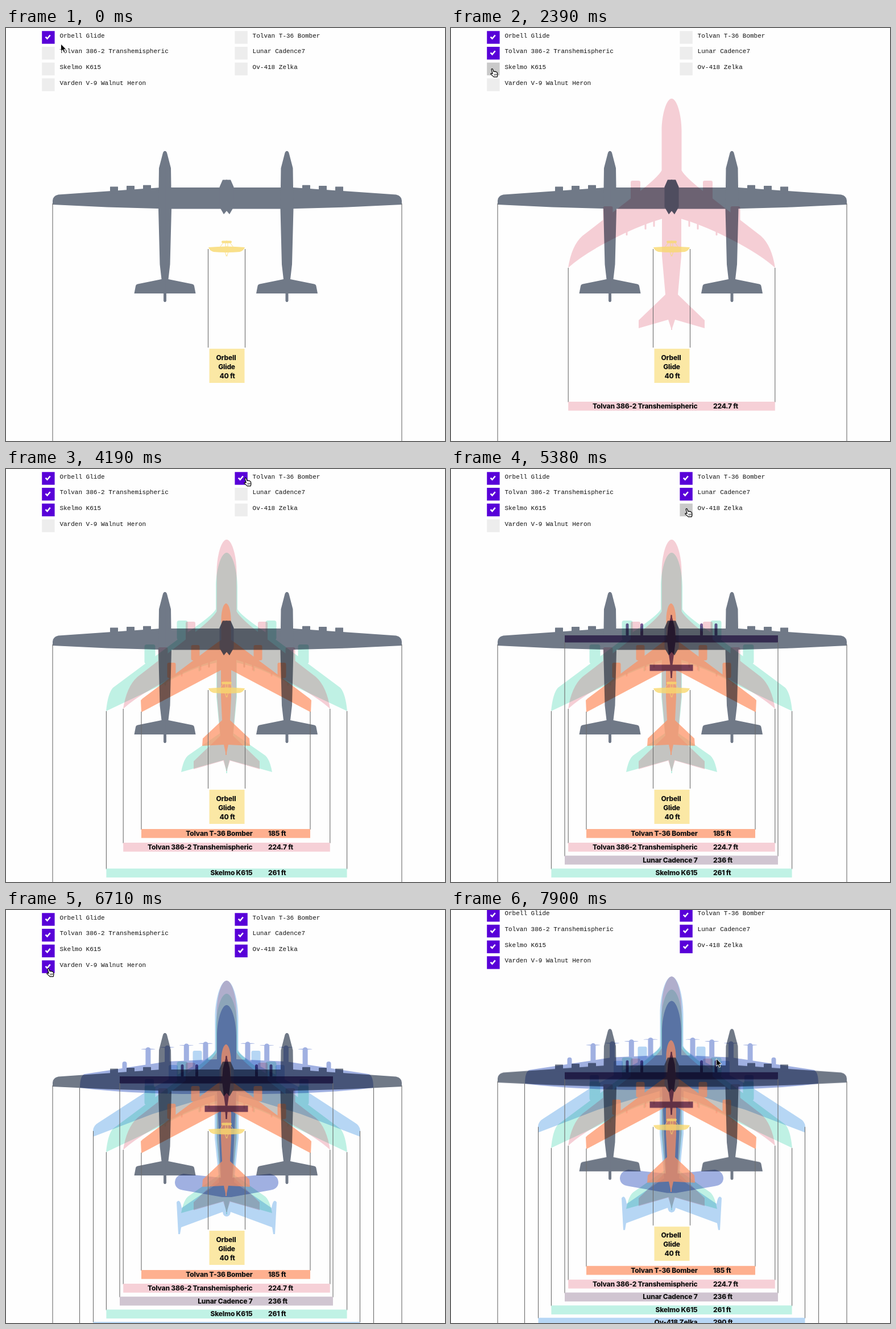
Recreate the animation shown at these times as an HTML page. Size 772x725 px, loop 8000 ms.

```html
<!DOCTYPE html>
<html lang="en">
<head>
<meta charset="utf-8">
<title>Wingspan comparison</title>
<style>
  html, body { margin: 0; width: 100%; height: 100%; overflow: hidden; background: #fefefe; }
  svg { display: block; width: 772px; height: 725px; }
  .item { font: 11px "Liberation Mono", "DejaVu Sans Mono", monospace; fill: #111; }
  .tag { font: 800 12px Inter, "Open Sans", sans-serif; letter-spacing: -.2px; fill: #111; }
  .drop { stroke: #6c6c6c; stroke-width: 1.1; fill: none; }
  .blend { mix-blend-mode: multiply; }
</style>
</head>
<body>
<svg id="stage" viewBox="0 0 772 725" xmlns="http://www.w3.org/2000/svg"></svg>
<script>
const LOOP = 8000, STEP = 150, MID = 388;
const stage = document.getElementById('stage');

function add(parent, tag, attrs = {}, text) {
  const el = document.createElementNS('http://www.w3.org/2000/svg', tag);
  for (const k in attrs) el.setAttribute(k, attrs[k]);
  if (text) el.textContent = text;
  parent.appendChild(el);
  return el;
}
const show = (el, on) => el.setAttribute('visibility', on ? 'visible' : 'hidden');

const scene = add(stage, 'g');
add(scene, 'rect', { x: 0, y: -20, width: 772, height: 800, fill: '#fefefe' });

const plane = (fill, opacity) => add(scene, 'g', opacity ? { fill, opacity } : { fill, class: 'blend' });

// Draws the right half of a shape and its reflection; x is measured from cx.
function mirror(g, d, cx = MID) {
  for (const s of [1, -1]) add(g, 'path', { d, transform: `translate(${cx} 0) scale(${s} 1)` });
}
// Mirrored pods (engines, floats, propellers) whose tops follow the line y0 + slope * x.
function pods(g, xs, y0, slope, w, h, r = w / 2) {
  for (const x of xs)
    for (const s of [-1, 1])
      add(g, 'rect', { x: MID + s * x - w / 2, y: y0 + slope * x, width: w, height: h, rx: r });
}
// A rounded nose of half-width w, followed by the wing and tail outlines.
function fuselage(g, nose, w, wing, tail, cx) {
  mirror(g, `M-1 ${nose}H0C${w * .55} ${nose} ${w} ${nose + w * 1.7} ${w} ${nose + w * 3.2}${wing}${tail}H-1Z`, cx);
}

// Double-decker
const mint = plane('#c0f2e5');
fuselage(mint, 147, 19,
  'V246Q24 257 75 291L200 384Q209 394 212 425L110 377Q60 348 18 340',
  'V400L12 464 68 503Q76 510 80 532L5 511 0 534');
pods(mint, [78, 135], 208.5, .737, 19, 34, 4);
pods(mint, [31, 48, 108], 315, .42, 3, 20);

// Jumbo jet
const pink = plane('#d62949', .22);
fuselage(pink, 124, 17.5,
  'V250Q24 262 60 290L157 365Q176 382 182 421Q150 392 80 359Q45 343 17 335',
  'V400L11 468 58 513V527L6 512 0 530');
pods(pink, [63.5, 112], 209, .928, 17, 34, 3);
pods(pink, [31, 46, 79], 319, .32, 3, 20);

// Cargo lifter
const blue = plane('#b7d7f5');
fuselage(blue, 124, 20.5,
  'V246Q24 257 60 275L137 316 225 373Q234 378 235 387V398L130 358 21 325',
  'V400L13 478 79 523Q82 505 88 513L85 569H82L80 557 7 530Q6 538 0 538');
pods(blue, [51.5, 94, 136], 216.6, .59, 16, 34, 3);

// Flying boat
const boat = plane('#a1b1e2');
fuselage(boat, 167, 17,
  'V262L105 266 250 288Q258 291 258 312Q180 322 60 323L17 319',
  'L10 470 76 463Q91 466 91 479Q90 490 76 492L8 504');
const props = [0, 1, 2, 3].map(i => 37 + i * 33.7);
pods(boat, props, 227.5, .098, 9, 42);
pods(boat, props, 230, .098, 25, 1.4);
pods(boat, [179.5], 266, 0, 8, 30);

// Bomber
const orange = plane('#fe8f5f', .7);
fuselage(orange, 236, 8.5,
  'V300L20 308 147 403 150 406 149 427 9 353',
  'V400L7 441 41 473 42 486 4 484 0 502', MID - 1);
pods(orange, [55, 97], 268.4, .738, 15, 27, 3);

// Twin-fuselage carrier
const slate = plane('#707988');
const hub = 'M-1 266.5H7L12.5 279V314L5 327 0 321H-1Z';
mirror(slate, 'M-1 280H116L297 292.5Q307 295 307 303V310L211 314.5 105 317.5H-1Z', MID + 1);
pods(slate, [140, 169, 198], 269, .048, 14, 12, .5);
mirror(slate, hub);
for (const x of [279.5, 494])
  mirror(slate, 'M-1 216H0Q3 216 4 221L10.5 246 11.5 317 9 415 6 441 48 449.5Q51 450 51.5 453L54 466H2.5V479Q2 481 0 481H-1Z', x);
const hubShade = plane('#3c4054', .6);
mirror(hubShade, hub);

// Sun-powered aircraft
const solar = plane('#785a96');
fuselage(solar, 256, 1.5,
  'L6 278 7 292H187.5V304.5H7L5 322 2 343.5',
  'H38V354.5H2L1 367', MID - .5);
pods(solar, [52.5, 78], 271, 0, 5, 22);

// Early biplane
const flyer = plane('#f9d96e', .8);
mirror(flyer, 'M-1 383.5H0Q16 383.5 32 385Q30 391 23 393Q12 394 -1 394Z');
mirror(flyer, 'M-1 373.5H7Q9 373.5 9 375.6T7 377.8H-1Z');
add(flyer, 'path', {
  d: 'M382 377L376 385M394 377L400 385M386 377V385M390 377V385M385 393L387.5 400M391 393L388.5 400M386.5 400H389.5',
  stroke: '#f9d96e', fill: 'none'
});

// Drop lines, span bars and their captions
function drops(cx, half, from, to) {
  const g = add(scene, 'g');
  add(g, 'path', { class: 'drop', d: `M${cx - half} ${from}V${to}M${cx + half} ${from}V${to}` });
  return g;
}
function bar(half, from, y, fill, name, span, cx = MID) {
  const g = drops(cx, half, from, y + 1);
  add(g, 'rect', { x: cx - half, y, width: half * 2, height: 15.7, fill });
  add(g, 'text', { class: 'tag', x: 433.5, y: y + 12, 'text-anchor': 'end' }, name);
  add(g, 'text', { class: 'tag', x: 461, y: y + 12 }, span);
  return g;
}
drops(389, 307, 308, 790);
const flyerTag = drops(MID, 32.5, 388, 561);
add(flyerTag, 'rect', { x: 357.5, y: 563, width: 62, height: 60, fill: '#fbe8a5' });
['Orbell', 'Glide', '40 ft'].forEach((s, i) =>
  add(flyerTag, 'text', { class: 'tag', x: 387 + i, y: 582.5 + i * 16, 'text-anchor': 'middle' }, s));

const orangeBar = bar(148.5, 426, 632, '#feb08f', 'Tolvan T-36 Bomber', '185 ft', 386.5);
const pinkBar = bar(181.8, 421, 656, '#f6d0d7', 'Tolvan 386-2 Transhemispheric', '224.7 ft');
const solarBar = bar(187.5, 304, 678.7, '#d0c5d1', 'Lunar Cadence 7', '236 ft', 387.5);
const mintBar = bar(211.6, 425, 701.4, '#c0f2e5', 'Skelmo K615', '261 ft');
const blueBar = bar(234.5, 388, 723, '#b7d7f5', 'Ov-418 Zelka', '290 ft');
const boatDrops = drops(MID, 258.5, 312, 790);

// Checklist: name, click time, parts shown once checked
const items = [
  ['Orbell Glide', 0, flyer, flyerTag],
  ['Tolvan 386-2 Transhemispheric', 1640, pink, pinkBar, hubShade],
  ['Skelmo K615', 3140, mint, mintBar],
  ['Varden V-9 Walnut Heron', 6710, boat, boatDrops],
  ['Tolvan T-36 Bomber', 4190, orange, orangeBar],
  ['Lunar Cadence7', 4790, solar, solarBar],
  ['Ov-418 Zelka', 5830, blue, blueBar]
].map(([name, click, ...parts], i) => {
  const x = 63.2 + Math.floor(i / 4) * 339.2, y = 5.3 + (i % 4) * 27.7;
  const box = add(scene, 'rect', { x, y, width: 22.4, height: 22.4 });
  const tick = add(scene, 'path', {
    d: `M${x + 6.4} ${y + 10.4}l2.9 3l5.2 -6.2`, fill: 'none', stroke: '#fff', 'stroke-width': 2.5
  });
  add(scene, 'text', { class: 'item', x: x + 31.2, y: y + 11.3 }, name);
  return { x, y, box, tick, click, parts };
});

// Pointers, each with its tip at the origin
const arrow = add(stage, 'path', {
  d: 'M.5 0V13.2L3.6 10.4L5.8 15.3L8 14.3L5.9 9.6H10Z', fill: '#000', stroke: '#fff', 'stroke-width': .9
});
const hand = add(stage, 'g', { stroke: '#000', 'stroke-linejoin': 'round' });
add(hand, 'path', {
  d: 'M1.2 9.2L-.8 2.4Q-1 .8 .2 .7Q1.2 .6 1.7 2L3 5.6Q4.2 4.6 5.2 5.8Q6.6 5 7.4 6.3Q9 6 9.4 7.6L10 11L9.2 14.8H3.2Q1 12.6 -1.8 10.4Q-2.6 8.8 -1 8.6Z',
  fill: '#fff', 'stroke-width': 1.2
});
add(hand, 'path', { d: 'M4 9.6l.5 3m1.5 -3.2l.4 3m1.5 -3.2l.3 2.8', 'stroke-width': .8, fill: 'none' });

// Pointer moves: start time, number of steps, destination
const moves = [
  [590, 2, 87, 42], [1040, 2, 75, 44], [2090, 3, 72, 71], [3290, 3, 421, 15],
  [4340, 3, 414, 43], [4940, 3, 414, 69], [5980, 3, 74, 102], [7600, 2, 466, 261]
];
function pointerAt(t) {
  let x = 96, y = 28;
  for (const [start, steps, toX, toY] of moves) {
    if (t < start) break;
    const k = Math.min(1, (Math.floor((t - start) / STEP) + 1) / steps);
    x += (toX - x) * k;
    y += (toY - y) * k;
  }
  return { x, y };
}

function render(t) {
  const p = pointerAt(t);
  let over = false;
  for (const { x, y, box, tick, click, parts } of items) {
    const on = t >= click;
    const hover = p.x >= x && p.x < x + 22.4 && p.y >= y && p.y < y + 22.4;
    over = over || hover;
    box.setAttribute('fill', on ? '#5800d8' : hover ? '#c9c9c9' : '#ededed');
    show(tick, on);
    parts.forEach(part => show(part, on));
  }
  show(hand, over);
  show(arrow, !over);
  (over ? hand : arrow).setAttribute('transform', `translate(${p.x} ${p.y})`);
  scene.setAttribute('transform', `translate(0 ${t >= 7900 ? -7.2 : t >= 7750 ? -2 : 0})`);
}

const start = performance.now();
function frame() {
  render((performance.now() - start) % LOOP);
  requestAnimationFrame(frame);
}
frame();
</script>
</body>
</html>
```
